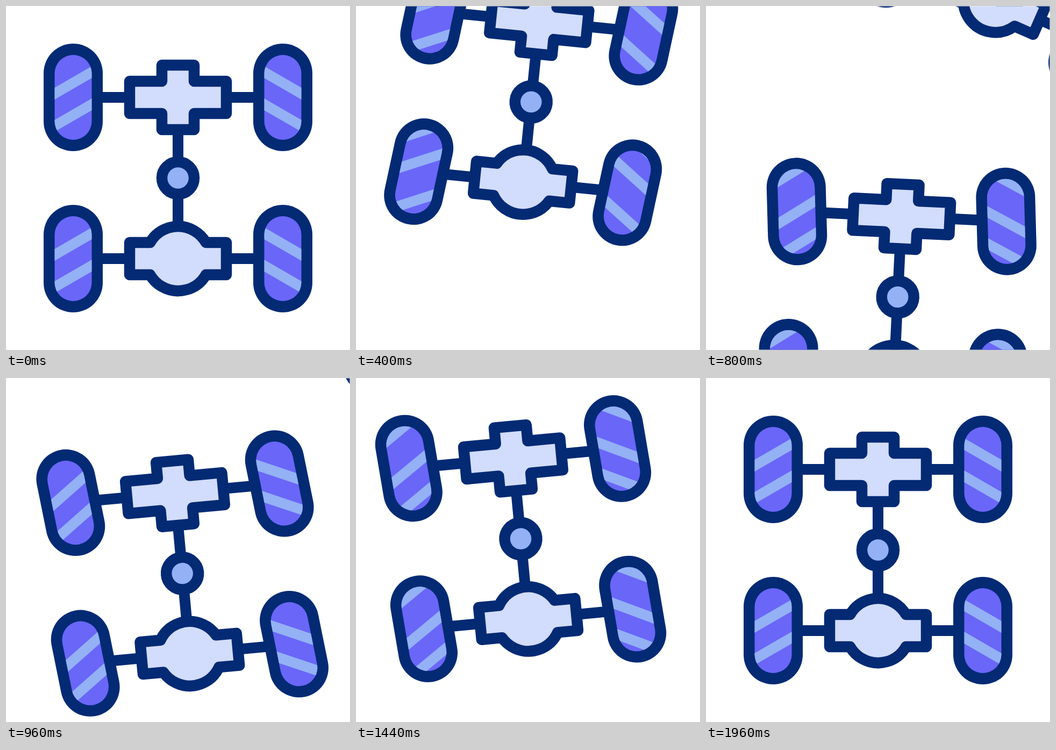
These frames come from a looping animation (640x640 px, 2 s). An HTML page with a canvas:

```html
<!DOCTYPE html>
<html lang="en">
<head>
<meta charset="utf-8">
<title>Drivetrain</title>
<style>
html, body { margin: 0; width: 100%; height: 100%; overflow: hidden; background: #fff; }
canvas { display: block; width: 640px; height: 640px; }
</style>
</head>
<body>
<canvas id="stage" width="640" height="640"></canvas>
<script>
const ctx = document.getElementById('stage').getContext('2d');
const NAVY = '#042a74', VIOLET = '#6a66f8', BLUE = '#93b1f4', PALE = '#d2dcfc';
const LOOP = 2000, STEP = 40, TREAD = 138;
const LINE = 20.5;

const clamp = v => Math.min(1, Math.max(0, v));
const smooth = p => p * p * (3 - 2 * p);
const span = (t, from, to) => clamp((t - from) / (to - from));
const ease = (t, from, to) => smooth(span(t, from, to));
const rad = deg => deg * Math.PI / 180;

function capsule(r, half) {
  ctx.beginPath();
  ctx.arc(0, -half, r, Math.PI, 0);
  ctx.arc(0, half, r, 0, Math.PI);
  ctx.closePath();
}

function stripe(y) {
  const rise = 40 * Math.tan(rad(30));
  ctx.beginPath();
  ctx.moveTo(-40, y + rise - 11);
  ctx.lineTo(40, y - rise - 11);
  ctx.lineTo(40, y - rise + 11);
  ctx.lineTo(-40, y + rise + 11);
  ctx.fill();
}

function wheel(x, y, steer, roll) {
  ctx.save();
  ctx.translate(x, y);
  ctx.rotate(rad(steer));
  ctx.fillStyle = NAVY;
  capsule(55, 45);
  ctx.fill();
  capsule(34.5, 44.5);
  ctx.fillStyle = VIOLET;
  ctx.fill();
  ctx.clip();
  if (x > 0) ctx.scale(-1, 1);
  ctx.fillStyle = BLUE;
  const shift = ((roll % TREAD) + TREAD) % TREAD;
  for (let k = -2; k <= 1; k++) {
    stripe(shift + k * TREAD - 27);
    stripe(shift + k * TREAD + 33);
  }
  ctx.restore();
}

function outlined(fill) {
  ctx.fillStyle = fill;
  ctx.fill();
  ctx.stroke();
}

function cross(y) {
  const pts = [[-90, -30], [-30, -30], [-30, -60], [30, -60], [30, -30], [90, -30],
               [90, 30], [30, 30], [30, 60], [-30, 60], [-30, 30], [-90, 30]];
  ctx.beginPath();
  for (const [px, py] of pts) ctx.lineTo(px, y + py);
  ctx.closePath();
  outlined(PALE);
}

function differential(y) {
  const a = Math.asin(0.5);
  ctx.beginPath();
  ctx.moveTo(-90, y - 30);
  ctx.arc(0, y, 60, Math.PI + a, -a);
  ctx.lineTo(90, y - 30);
  ctx.lineTo(90, y + 30);
  ctx.arc(0, y, 60, a, Math.PI - a);
  ctx.lineTo(-90, y + 30);
  ctx.closePath();
  outlined(PALE);
}

function chassis({ x, y, turn, steer, lag = 0 }, roll) {
  ctx.save();
  ctx.translate(x, y);
  ctx.rotate(rad(turn));
  ctx.strokeStyle = NAVY;
  ctx.lineJoin = 'round';
  ctx.lineWidth = 20;
  ctx.beginPath();
  for (const ay of [-150, 150]) {
    ctx.moveTo(-195, ay);
    ctx.lineTo(195, ay);
  }
  ctx.moveTo(0, -150);
  ctx.lineTo(0, 150);
  ctx.stroke();

  ctx.lineWidth = LINE;
  cross(-150);
  differential(150);
  ctx.beginPath();
  ctx.arc(0, 0, 30, 0, 2 * Math.PI);
  outlined(BLUE);

  for (const wy of [-150, 150]) {
    wheel(-195, wy, steer, roll);
    wheel(195, wy, steer, roll - lag);
  }
  ctx.restore();
}

// Drives off upwards, bending to the right; the inner wheels roll less.
function leaving(t) {
  const e = ease(t, 120, 1220), bend = 0.1613;
  const dx = e < bend ? 5.7 * (e / bend) ** 4
                      : e * (-107 + e * (918.5 - 216 * e));
  const turn = 34 * ease(t, 120, 1190);
  return {
    x: 320 + dx,
    y: 320 - e * (878.5 + e * (73 - 513 * e)),
    turn,
    steer: 13.55 * (ease(t, 120, 700) - ease(t, 700, 1000)),
    lag: 2.2 * turn
  };
}

// Comes in from below, overshoots, then rolls back into place.
function arriving(t) {
  if (t < 1120) {
    const r = 1 - ease(t, 320, 1120);
    const q = 1 - ease(t, 520, 1120);
    return {
      x: 300 + r * (317 - 443 * r),
      y: 289 + 717 * r,
      turn: -8.95 + 21.2 * q,
      steer: -7.15 + 5.2 * q
    };
  }
  const r = 1 - ease(t, 1120, 1960);
  const q = settle(t);
  return { x: 320 - 20 * r, y: 320 - 31 * r, turn: -8.95 * q, steer: -7.15 * q };
}

const settle = t => 1 - smooth(span(t, 1120, 1960) ** 0.87);

const rolled = t => t < 1120 ? 601 * ease(t, 180, 1115) : 552 + 49 * settle(t);

function draw(t) {
  ctx.fillStyle = '#fff';
  ctx.fillRect(0, 0, 640, 640);
  ctx.save();
  ctx.beginPath();
  ctx.rect(0.5, 0.5, 639, 639);
  ctx.clip();
  const roll = rolled(t);
  if (t < 1000) chassis(leaving(t), roll);
  if (t > 500) chassis(arriving(t), roll);
  ctx.restore();
}

const start = performance.now();
function tick() {
  const t = (performance.now() - start) % LOOP;
  draw(Math.floor(t / STEP) * STEP);
  requestAnimationFrame(tick);
}
tick();
</script>
</body>
</html>
```
